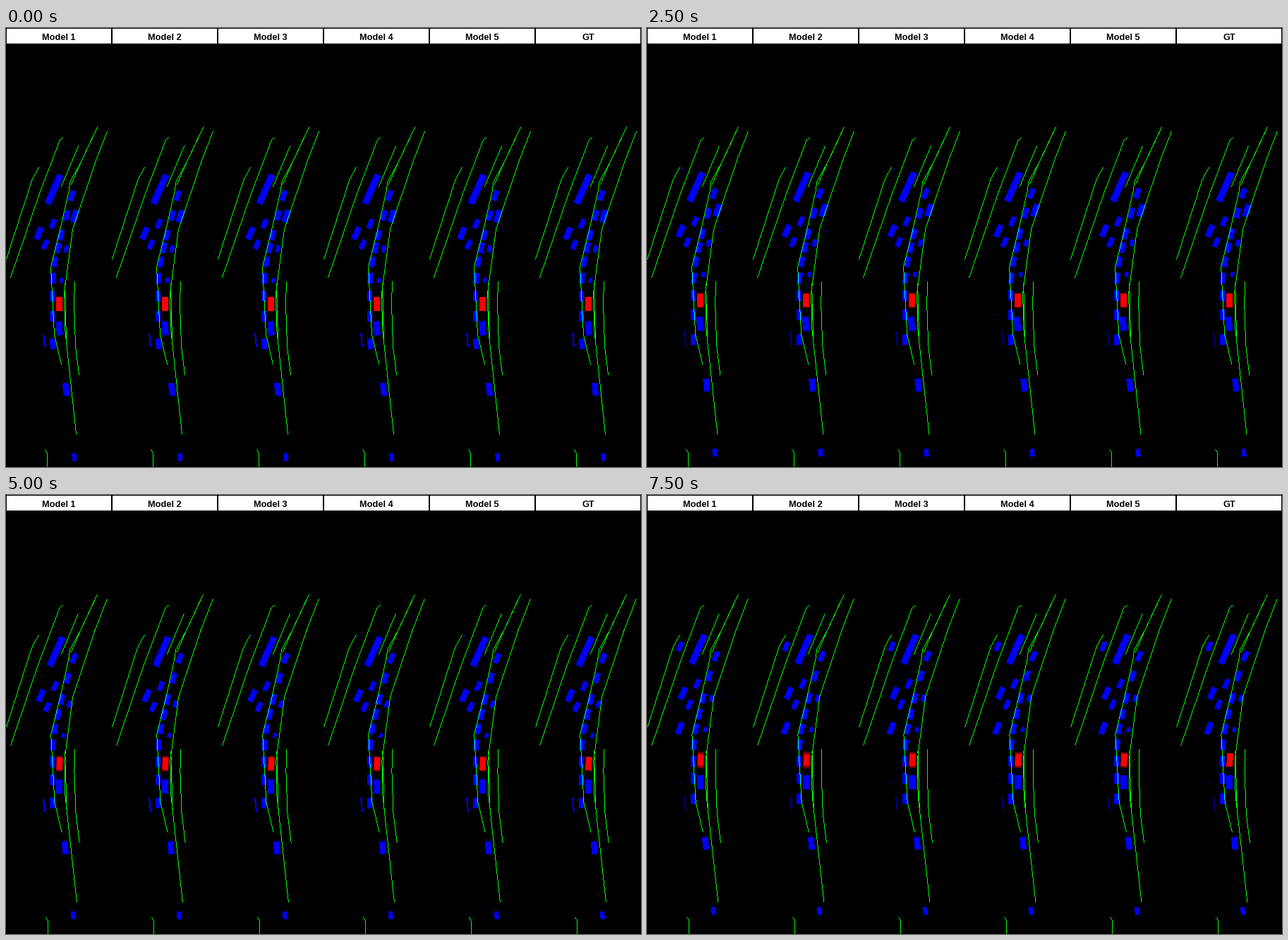
Recreate the animation shown at these times as a matplotlib script. Size 900x622 px, loop 8 s.

```python
import numpy as np
import matplotlib.pyplot as plt
from matplotlib.animation import FuncAnimation

W, H, DPI = 900, 622, 100
PANELS = 6
PANEL = W // PANELS
FRAMES, STEP = 16, 500
HEADER = 22

# Key points of the road lines in one panel
ROADS = [
    [(0, 327), (37, 213), (46, 197)],
    [(6, 353), (47, 234), (76, 158), (80, 155)],
    [(78, 224), (102, 167)],
    [(129, 140), (107, 187), (90, 218), (89, 229), (76, 286), (63, 338),
     (68, 434), (78, 476)],
    [(126, 146), (105, 191), (92, 221)],
    [(143, 146), (127, 187), (94, 285), (82, 375), (83, 425), (99, 575)],
    [(83, 362), (85, 443)],
    [(97, 359), (96, 390), (98, 450), (103, 491)],
    [(55, 597), (58, 602), (58, 622)],
]

# Lane centres as (y, x) key points
QUEUE = [(200, 110), (237, 93), (293, 77.5), (331, 69), (354, 66),
         (380, 65), (440, 65), (500, 70)]
OWN = [(360, 75.5), (420, 74.5), (511, 84.5), (630, 99)]
RIGHT = [(230, 109), (266, 96.5), (312, 85), (357, 78), (380, 74)]

# Softness of the red box in each panel
SPREAD = [3, 3.2, 1.8, 2, 1.6, 0]

yy, xx = np.mgrid[:H, :PANEL]


def box(x, y, length, deg):
    """Mask of a vehicle; width follows from its length."""
    width = min(3 + 0.3 * length, 9.5)
    a = np.radians(deg)
    across = (xx - x) * np.cos(a) + (yy - y) * np.sin(a)
    along = (xx - x) * np.sin(a) - (yy - y) * np.cos(a)
    return (abs(across) <= width / 2) & (abs(along) <= length / 2)


def plot_line(layer, points):
    """One pixel wide polyline without smoothing."""
    points = np.asarray(points, float)
    for a, b in zip(points, points[1:]):
        n = int(np.ceil(abs(b - a).max())) + 1
        x, y = np.rint(np.linspace(a, b, n)).astype(int).T
        ok = (x >= 0) & (x < PANEL) & (y >= 0) & (y < H)
        layer[y[ok], x[ok]] = 255


def in_lane(lane, y, length):
    ys, xs = zip(*lane)
    ahead, x, behind = np.interp([y - 10, y, y + 10], ys, xs)
    return box(x, y, length, np.degrees(np.arctan2(ahead - behind, 20)))


def queue_travel(y):
    """Cars stand still mid-queue; front pulls away, rear closes up."""
    front = min(0.25 * max(315 - y, 0), 9)
    rear = 0.00125 * max(y - 331, 0) ** 2
    return front + rear


def draw_roads(layer, p):
    for road in ROADS:
        x, y = np.array(road, float).T
        x = x + p * (0.5 + 0.004 * (y - 380))
        plot_line(layer, np.column_stack([x, y + 0.8 * p]))


def draw_traffic(layer, i, p):
    cars = [in_lane(QUEUE, y - p * queue_travel(y), 15)
            for y in (237, 265, 293, 311, 331, 354, 379.5, 408, 447)]
    cars += [in_lane(OWN, y - 18.5 * p, n)
             for y, n in ((425, 20), (511.5, 18), (607.5, 11))]
    cars += [in_lane(RIGHT, y - 25 * p, n)
             for y, n in ((266, 18), (312.5, 10), (357, 7))
             if n < 18 or i < 7]
    cars += [box(x + 4.5 * p, y - 10 * p, n, 24)
             for x, y, n in ((67.5, 228, 45), (66, 277, 14),
                             (46, 290.5, 18), (55, 306.5, 14))]
    if i >= 12:
        cars += [box(46.5, 214, 14, 22), box(46, 330, 18, 22)]
    layer[np.any(cars, axis=0)] = 255

    top = 432 - 4.5 * p
    for dx in (0, 1):
        plot_line(layer, [(52 + dx, top), (54 + dx, top + 19)])

    # Stray detections by the roadside
    rng = np.random.default_rng(40 + i)
    for x, y in ((103, 281), (102, 288), (49, 198), (45, 405)):
        x, y = np.rint(rng.normal((x, y), 1.5)).astype(int)
        layer[y, x:x + rng.integers(1, 3)] = 255


def ego(p, spread):
    """Red box, averaged over a growing range of guesses."""
    shifts = np.linspace(-1, 1, 9) * spread * p ** 1.3
    masks = [box(75 + 0.6 * p + 0.2 * s, 390.5 - 15.5 * p + s, 19.5, 3 * p)
             for s in shifts]
    return 255 * np.mean(masks, axis=0)


def render(i):
    p = i / (FRAMES - 1)
    base = np.zeros((H, PANEL, 3), np.uint8)
    draw_roads(base[..., 1], p)
    draw_traffic(base[..., 2], i, p)
    base[1:HEADER, 1:PANEL - 1] = 255
    frame = np.tile(base, (1, PANELS, 1))
    for k, spread in enumerate(SPREAD):
        red = frame[:, k * PANEL:(k + 1) * PANEL, 0]
        np.maximum(red, ego(p, spread).astype(np.uint8), out=red)
    return frame


fig = plt.figure(figsize=(W / DPI, H / DPI), dpi=DPI, facecolor="black")
ax = fig.add_axes([0, 0, 1, 1])
ax.set_axis_off()
image = ax.imshow(render(0), interpolation="nearest", aspect="auto")

for k in range(PANELS):
    label = f"Model {k + 1}" if k < PANELS - 1 else "GT"
    ax.text(k * PANEL + 74.5, 16.5, label, ha="center", va="baseline",
            family="Liberation Sans", weight="bold", size=9.2)


def update(i):
    image.set_data(render(i))
    return [image]


anim = FuncAnimation(fig, update, frames=FRAMES, interval=STEP,
                     init_func=lambda: update(0), repeat=True,
                     repeat_delay=0)
plt.show()
```
